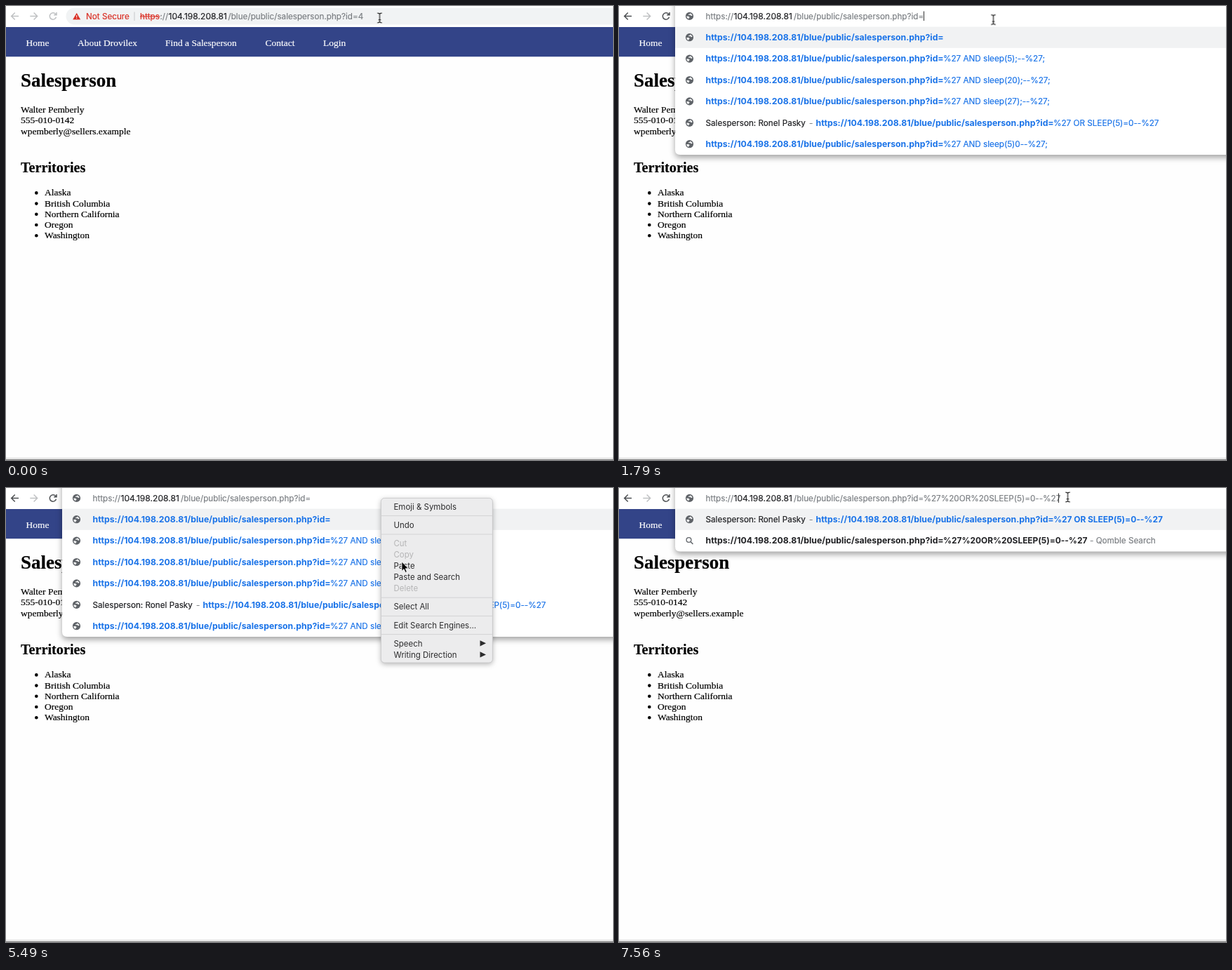
Recreate the animation shown at these times as an HTML page. Size 865 by 647 pixels, loop 8 s.

```html
<!DOCTYPE html>
<html lang="en">
<head>
<meta charset="utf-8">
<title>Salesperson</title>
<style>
html, body { margin: 0; width: 100%; height: 100%; overflow: hidden; background: #fff; }
svg { display: block; width: 865px; height: 647px; }
text { white-space: pre; stroke-width: .2; }
.page { font: 13.47px "Liberation Serif", serif; }
.page text { stroke: #000; }
.page .nav { fill: #fff; stroke: #fff; }
.h1 { font-size: 26.94px; font-weight: 700; }
.h2 { font-size: 20.2px; font-weight: 700; }
.ui { font: 11.7px Inter, sans-serif; font-feature-settings: "calt" 0; }
.blue { fill: #1a73e8; stroke: #1a73e8; }
.red { fill: #d93025; stroke: #d93025; stroke-width: .2; }
.gray { fill: #7b7f83; stroke: #7b7f83; }
.dark { fill: #202124; stroke: #202124; }
.host { font-size: 12.1px; }
.bold { font-size: 12.28px; font-weight: 700; stroke: none; }
.strong { font-size: 11.9px; font-weight: 700; stroke: none; }
.menu text { font-size: 11.45px; fill: #2c2c2d; }
.menu .off { fill: #b5b5b6; }
.menu .lit text { fill: #fff; }
.popup .card { fill: #fff; filter: drop-shadow(0 4px 4px rgba(0,0,0,.36)); }
.menu .card { fill: #ececed; stroke: #c3c3c4; stroke-width: .8; filter: drop-shadow(0 2px 3.5px rgba(0,0,0,.28)); }
.icon { fill: none; stroke: #bfc1c3; stroke-width: 1.5; }
.caret { fill: #333; }

/* Everything changes in hard steps on one shared 8 s clock. */
.wake, .ring, .select, .caret, .popup, .menu, .lit, .beam, .arrow {
  animation: 8s step-end infinite;
}
.wake { animation-name: wake; }
.ring { animation-name: ring; }
.select { animation-name: select; }
.caret.a { animation-name: caret-a; }
.caret.b { animation-name: caret-b; }
.caret.c { animation-name: caret-c; }
.popup.first { animation-name: first; }
.popup.pasted { animation-name: pasted; }
.menu { animation-name: menu; }
.lit.emoji { animation-name: lit-emoji; }
.lit.undo { animation-name: lit-undo; }
.lit.paste { animation-name: lit-paste; }
.beam { animation-name: beam; }
.arrow { animation-name: arrow; }

@keyframes wake { 0% { stroke: #bfc1c3 } 1.875% { stroke: #4d5053 } }
@keyframes ring { 0% { opacity: 0 } 1.875% { opacity: .5 } 3.75% { opacity: 1 } }
@keyframes select { 0%, 9.375% { opacity: 0 } 3.75% { opacity: 1 } }
@keyframes caret-a { 0%, 16.75% { opacity: 0 } 11.25% { opacity: 1 } }
@keyframes caret-b {
  0%, 28%, 40.875%, 52.125%, 65% { opacity: 0 }
  22.375%, 33.5%, 46.5%, 59.5% { opacity: 1 }
}
@keyframes caret-c {
  0%, 76%, 88.875% { opacity: 0 }
  74.125%, 81.625%, 94.5% { opacity: 1 }
}
@keyframes first { 0%, 74.125% { opacity: 0 } 22.375% { opacity: 1 } }
@keyframes pasted { 0% { opacity: 0 } 74.125% { opacity: 1 } }
@keyframes menu { 0%, 72.25% { opacity: 0 } 31.625% { opacity: 1 } 70.5% { opacity: .4 } }
@keyframes lit-emoji { 0%, 54% { opacity: 0 } 50.25% { opacity: 1 } }
@keyframes lit-undo { 0%, 55.75% { opacity: 0 } 54% { opacity: 1 } }
@keyframes lit-paste { 0%, 68.625% { opacity: 0 } 59.5% { opacity: 1 } }
@keyframes beam {
  0% { opacity: 1; transform: translate(532.5px, 17px) }
  3.75% { opacity: 1; transform: translate(533px, 18px) }
  9.375% { opacity: 1; transform: translate(533.5px, 19.5px) }
  31.625% { opacity: 0; transform: translate(533.5px, 19.5px) }
  85.25% { opacity: 1; transform: translate(626px, 22px) }
  87.125% { opacity: 1; transform: translate(636px, 15px) }
  88.875% { opacity: 1; transform: translate(639.5px, 13px) }
}
@keyframes arrow {
  0% { opacity: 0; transform: translate(532.5px, 18px) }
  31.625% { opacity: 1; transform: translate(532.5px, 18px) }
  50.25% { opacity: 1; transform: translate(536px, 23px) }
  52.125% { opacity: 1; transform: translate(543px, 31px) }
  54% { opacity: 1; transform: translate(552px, 50px) }
  55.75% { opacity: 1; transform: translate(559px, 76px) }
  57.625% { opacity: 1; transform: translate(564px, 97px) }
  59.5% { opacity: 1; transform: translate(566px, 104px) }
  61.375% { opacity: 1; transform: translate(565px, 104.5px) }
  63.125% { opacity: 1; transform: translate(564px, 105px) }
  79.75% { opacity: 1; transform: translate(568px, 98px) }
  81.625% { opacity: 1; transform: translate(582px, 74px) }
  83.375% { opacity: 1; transform: translate(602px, 46px) }
  85.25% { opacity: 0; transform: translate(622px, 27px) }
}
</style>
</head>
<body>
<svg viewBox="0 0 865 647">
  <defs>
    <g id="globe">
      <circle r="5.6" fill="#5f6368"/>
      <path d="M-4.4 .2 L-1.2 .4 L.4 2 L-1 2.6 L-1.2 4.2 Q-4 3.2 -4.4 .2Z M.8 -4.2 Q3.6 -3.2 4.2 -.6 L1.8 -.4 L1.4 -1.6 L-1.4 -1.4 L-1.2 -2.8 L.6 -3Z" fill="#f4f5f5"/>
    </g>
  </defs>

  <rect width="865" height="647" fill="#fefefe"/>
  <rect width="865" height="30" fill="#fff"/>
  <g class="page" id="page">
    <rect y="30" width="865" height="42.2" fill="#334488"/>
  </g>
  <rect y="643.6" width="865" height="1.2" fill="#dedede"/>
  <rect y="645.8" width="865" height="1.2" fill="#858585"/>

  <rect x="85.5" y="2.8" width="820" height="23.6" rx="11.8" fill="#f1f3f4"/>
  <rect class="ring" x="85.9" y="2.9" width="820" height="23.4" rx="11.7" fill="#fff" stroke="#f0a6a7" stroke-width="1.7"/>
  <rect class="select" x="191" y="7" width="318" height="14" fill="#fcc3c2"/>
  <g class="ui" id="bar">
    <path d="M100.7 10 L106 19.2 H95.4Z" class="red"/>
    <path d="M100.7 13 V16 M100.7 16.8 V18" stroke="#fff"/>
    <path d="M183 8.5 V21" stroke="#c6c8ca"/>
  </g>
  <path d="M191 15 H219.5" stroke="#d93025" stroke-width="1.1"/>
  <rect class="caret a" x="509" y="7.5" width="1" height="13.5"/>

  <g class="popup first ui" id="first">
    <path class="card" d="M80 -20 H900 V212 H87 Q80 212 80 205Z"/>
    <rect x="80" y="29.6" width="785" height="30.2" fill="#f1f2f3"/>
  </g>
  <rect class="caret b" x="434" y="7.5" width="1" height="13.5"/>

  <g class="popup pasted ui" id="pasted">
    <path class="card" d="M80 -20 H900 V90.6 H87 Q80 90.6 80 83.6Z"/>
    <rect x="80" y="29.6" width="785" height="30.2" fill="#f1f2f3"/>
    <path d="M102.3 76.8 L105.4 80" stroke="#5f6368" stroke-width="1.5"/>
    <circle cx="99.5" cy="74" r="3.4" fill="none" stroke="#5f6368" stroke-width="1.3"/>
  </g>
  <rect class="caret c" x="626" y="7.5" width="1" height="13.5"/>

  <path class="icon wake" d="M18 14.5 H8 M12.7 9.5 L7.7 14.5 L12.7 19.5"/>
  <path class="icon" d="M34.3 14.5 H44.3 M39.6 9.5 L44.6 14.5 L39.6 19.5"/>
  <path class="icon wake" d="M71 12 A4.7 4.7 0 1 0 71.5 15.8 M72 9 V12.7 H68.2"/>

  <g class="menu ui" id="menu">
    <rect class="card" x="534.4" y="14.4" width="159" height="234.6" rx="5"/>
    <path d="M534.8 39.6 H693 M534.8 66 H693 M534.8 156.2 H693 M534.8 182.4 H693 M534.8 208.6 H693" stroke="#d3d3d4"/>
    <path d="M675.5 217.2 L684 221.3 L675.5 225.4Z M675.5 233.3 L684 237.4 L675.5 241.5Z" fill="#2c2c2d"/>
  </g>

  <path class="beam" d="M-3.2 -6.8 Q0 -6.8 0 -5 Q0 -6.8 3.2 -6.8 M0 -5 V5 M-3.2 6.8 Q0 6.8 0 5 Q0 6.8 3.2 6.8 M-1.6 2.6 H1.6" fill="none" stroke="#222" stroke-width="1.2"/>
  <path class="arrow" d="M0 0 V13.4 L3 10.6 L5.2 15.4 L7.3 14.5 L5.2 9.8 H9.2Z" fill="#000" stroke="#fff" stroke-width=".8"/>
</svg>
<script>
const NS = document.querySelector('svg').namespaceURI;
const byId = id => document.getElementById(id);

function add(parent, tag, attrs, content = '') {
  const node = document.createElementNS(NS, tag);
  for (const key in attrs) node.setAttribute(key, attrs[key]);
  node.textContent = content;
  return parent.appendChild(node);
}
const write = (parent, x, y, content, cls = '') =>
  add(parent, 'text', { x, y, class: cls }, content);

const scheme = 'https';
const host = '104.198.208.81';
const path = '/blue/public/salesperson.php?id=';
const url = `${scheme}://${host}${path}`;
const person = 'Salesperson: Ronel Pasky';

// Web page
const page = byId('page');
[[28.5, 'Home'], [102, 'About Drovilex'], [227, 'Find a Salesperson'], [369.5, 'Contact'], [452, 'Login']]
  .forEach(([x, label]) => write(page, x, 56.7, label, 'nav'));
write(page, 21, 115, 'Salesperson', 'h1');
['Walter Pemberly', '555-010-0142', 'wpemberly@sellers.example']
  .forEach((line, i) => write(page, 21, 152 + 15.25 * i, line));
write(page, 21, 236.5, 'Territories', 'h2');
['Alaska', 'British Columbia', 'Northern California', 'Oregon', 'Washington'].forEach((place, i) => {
  const y = 270.4 + 15.2 * i;
  add(page, 'circle', { cx: 43.3, cy: y - 4, r: 2.3 });
  write(page, 55, y, place);
});

// Address bar
const barY = 18.7;
const bar = byId('bar');
write(bar, 114, barY, 'Not Secure', 'red');
write(bar, 191, barY, scheme, 'red');
write(bar, 219.5, barY, '://', 'gray');
write(bar, 231.5, barY, host, 'dark host');
write(bar, 316.5, barY, path + '4', 'gray');

// Suggestion lists
const rowY = row => 49 + 30.4 * row;
const globe = (popup, y) =>
  add(popup, 'use', { href: '#globe', x: 100.5, y: y - 4.3 });

function typedUrl(popup, query) {
  globe(popup, barY);
  write(popup, 123.5, barY, `${scheme}://`, 'gray');
  write(popup, 163.5, barY, host, 'dark host');
  write(popup, 249, barY, path, 'gray');
  write(popup, 433.5, barY, query, 'gray');
}
function suggest(popup, row, query, { titled = false, weight = '' } = {}) {
  const y = rowY(row), x = titled ? 280.5 : 123.5;
  globe(popup, y);
  if (titled) {
    write(popup, 123.5, y, person, 'dark');
    write(popup, 271, y, '-', 'gray');
  }
  write(popup, x, y, url, 'blue bold');
  write(popup, x + 338.5, y, query, 'blue ' + weight);
}

const injected = '%27 OR SLEEP(5)=0--%27';
const encoded = injected.replaceAll(' ', '%20');

const first = byId('first');
typedUrl(first, '');
['', '%27 AND sleep(5);--%27;', '%27 AND sleep(20);--%27;', '%27 AND sleep(27);--%27;', injected, '%27 AND sleep(5)0--%27;']
  .forEach((query, row) => suggest(first, row, query, { titled: query === injected }));

const pasted = byId('pasted');
typedUrl(pasted, encoded);
suggest(pasted, 0, injected, { titled: true, weight: 'strong' });
write(pasted, 123.5, rowY(1), url, 'dark bold');
write(pasted, 462, rowY(1), encoded, 'dark strong');
write(pasted, 671, rowY(1), '- Qomble Search', 'gray');

// Context menu
const menu = byId('menu');
[
  [26.3, 'Emoji & Symbols', 'emoji'], [52.4, 'Undo', 'undo'],
  [78.6, 'Cut', 'off'], [94.7, 'Copy', 'off'], [110.8, 'Paste', 'paste'],
  [126.9, 'Paste and Search'], [143, 'Delete', 'off'], [169.2, 'Select All'],
  [195.3, 'Edit Search Engines…'], [221.4, 'Speech'], [237.5, 'Writing Direction'],
].forEach(([mid, label, kind = '']) => {
  write(menu, 552.5, mid + 4.2, label, kind);
  if (!kind || kind === 'off') return;
  const lit = add(menu, 'g', { class: 'lit ' + kind });
  add(lit, 'rect', { x: 534.8, y: mid - 7.8, width: 158.2, height: 15.8, fill: '#e9676a' });
  write(lit, 552.5, mid + 4.2, label);
});
</script>
</body>
</html>
```
